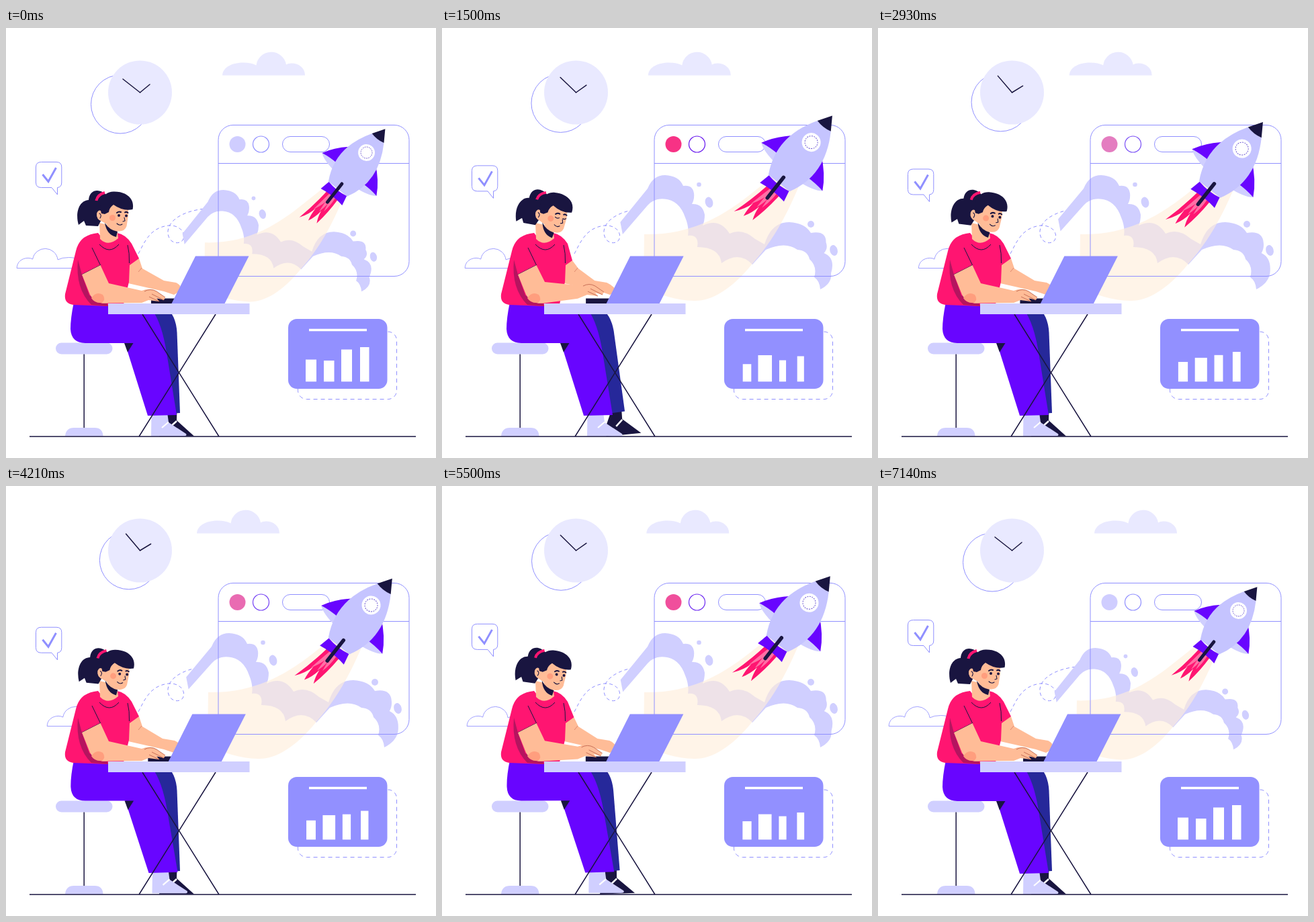
Recreate the animation shown at these times as an HTML page. Size 640 by 640 pixels, loop 7210 ms.

```html
<!DOCTYPE html>
<html lang="en">
<head>
<meta charset="utf-8">
<title>Launch</title>
<style>
  html, body { margin: 0; width: 100%; height: 100%; overflow: hidden; background: #fff; }
  svg { display: block; width: 100%; height: 100%; }
  .line { fill: none; stroke: #9090ff; }
  .ink { fill: none; stroke: #191540; }
  .dark { fill: #191540; }
  .pale { fill: #e9e9ff; }
  .lilac { fill: #d0cfff; }
  .peri { fill: #9290ff; }
  .violet { fill: #6805ff; }
  .red { fill: #ff1571; }
  .skin { fill: #ffbc97; }
  .white { fill: #fff; }
</style>
</head>
<body>
<svg viewBox="0 0 640 640">
  <defs>
    <path id="cloud" d="M0 0C1-13 16-19 31-19Q43-19 50.500-15A22.500 22.500 0 0 1 95-16Q98-18 103-18C114-18 123-11 123 0Z"/>
    <g id="wing">
      <path fill="#d0cfff" d="M58 97Q48 105 21 108L26 92Z"/>
      <path class="violet" d="M22 55Q46 74 58 97Q42 94 27 95Z"/>
    </g>
  </defs>

  <use href="#cloud" id="skyCloud" class="pale"/>
  <circle id="ring" class="line" r="43.500"/>
  <circle class="pale" cx="199.500" cy="96" r="47.500"/>
  <g class="ink" stroke-width="1.500" stroke-linecap="round">
    <path id="minuteHand" d="M199.500 96L174 76"/>
    <path id="hourHand" d="M199.500 96L214 84"/>
  </g>
  <g id="bubble" class="line">
    <path d="M52.500 199.500H75Q82.800 199.500 82.800 207V230Q82.800 237 76.500 237.500V248L68 237.500H52.500Q44.500 237.500 44.500 230V207Q44.500 199.500 52.500 199.500Z"/>
    <path stroke-width="3" d="M54.500 218L63 228.500L74.500 208"/>
  </g>
  <g id="lowCloud" class="line"><use href="#cloud" transform="translate(103 0) scale(-.84 .84)"/></g>

  <path class="line" stroke-dasharray="5 4" d="M197 336C207 317 215 297 242 294C262 293 269 309 262 317C253 324 240 317 241 302C243 286 262 273 295 269"/>

  <g id="trail">
    <path id="smoke" class="lilac"/>
    <g class="lilac">
      <circle cx="382.500" cy="233" r="3.300"/><ellipse cx="397.500" cy="259.500" rx="5.700" ry="8" transform="rotate(-15 397.500 259.500)"/>
      <circle cx="549" cy="292" r="5"/><ellipse cx="583" cy="331" rx="5.700" ry="8" transform="rotate(-15 583 331)"/>
    </g>
    <path fill="#ffeedb" fill-opacity=".64" d="M301 307C375 309 425 275 466 242L500 215L535 226C518 268 497 312 461 352C430 390 400 407 375 406Q335 405 300 384Z"/>
  </g>

  <g class="line">
    <rect x="316" y="144.500" width="284" height="225" rx="22"/>
    <path d="M316 201.500H600"/>
    <rect x="411.500" y="161.500" width="70" height="23" rx="11.500"/>
    <circle id="ringDot" cx="379.500" cy="173" r="12" stroke-width="1.200"/>
  </g>
  <circle id="dot" cx="344.500" cy="173" r="12"/>

  <!-- Drawn nose up from its tip, then tilted. -->
  <g id="rocket">
    <g id="flame">
      <path class="red" d="M-12 142Q-14 172-21 205Q-11 190-9 176Q-9 190-6 200Q0 188 1 174Q3 186 8 195Q12 168 11 142Z"/>
      <path fill="#ff6fa5" d="M-6 142Q-9 162-11 180Q-5 168-3 158Q-2 172-1 177Q2 166 2 157L5 172Q8 158 6 142Z"/>
    </g>
    <use href="#wing"/><use href="#wing" transform="scale(-1 1)"/>
    <path fill="#c5c4ff" d="M-12.700 19.600Q-48 76-20 128H20Q48 76 12.700 19.600Z"/>
    <path class="dark" d="M0 0L-12.700 19.600Q0 23 12.700 19.600Z"/>
    <path class="violet" d="M-19 128Q0 132 19 128L22.700 145Q0 141-22.700 145Z"/>
    <path class="ink" stroke-width="5.500" stroke-linecap="round" d="M0 117V156"/>
    <circle class="white" cy="50.500" r="14"/>
    <circle class="ink" cy="50.500" r="9.500" stroke-dasharray="2 1.500" style="stroke:#6a55d0"/>
  </g>

  <rect class="line" x="434.500" y="452" width="147" height="100.500" rx="13" stroke-dasharray="6 5"/>
  <rect class="peri" x="420" y="433" width="147.500" height="104" rx="13"/>
  <path class="white" d="M451 447.700H537V451.300H451Z"/>
  <g id="bars" class="white"></g>

  <g class="lilac">
    <rect x="74" y="468.500" width="84.500" height="17" rx="8.500"/>
    <path d="M88 607.500Q89 595 101 595H132Q144 595 144.500 607.500Z"/>
  </g>
  <path class="ink" stroke-width="1.500" d="M116.200 485.500V595"/>

  <g id="farLeg">
    <path class="dark" d="M240 568H254.500L254 584L280 607.500H228L230 590Z"/>
    <path stroke="#fff" stroke-width="2.500" d="M244 594L254 585"/>
    <path fill="#26289a" d="M200 415H237Q253 427 254.500 453L259 573L235 574Z"/>
  </g>
  <g id="nearShoe">
    <path class="lilac" d="M216.500 572H240L242 587L268 604Q270 607.500 264 607.500H216Z"/>
    <path stroke="#fff" stroke-width="2.200" d="M232 595L242 586.500"/>
  </g>
  <path id="nearLeg" class="violet"/>
  <path id="notch" class="dark" d="M176 469H189.500L181 482.500Z"/>
  <path class="ink" stroke-width="1.500" d="M203 426L317 608M312 426L198 608M35 608H610"/>

  <path id="farArm" class="skin"/>
  <path fill="none" stroke="#e08a70" d="M197 363L202 357"/>
  <path id="shirt" class="red"/>
  <path fill="#b5145f" d="M107 345Q103 388 127 412L152 414L150 408L124 398L113 367Z"/>
  <path class="skin" d="M139 290L140 314Q152 326 167 313L165 296Z"/>
  <path class="ink" d="M139 322Q154 338 168 322M128 327L140.500 353L113 367M181 323Q184 335 183.500 350"/>

  <g id="head">
    <path class="dark" d="M149 248C139 238 124 240 123 256C108 257 103 276 108 293L116 287L119 294L137 295L149 272Z"/>
    <path class="skin" d="M146 258L182 262L182 279L179.500 295Q177 302.500 168 302.500Q158 302 150 292L143 288Q134 285 135 276Q138 268 144 274Z"/>
    <path class="dark" d="M147 290Q154 301 166 303L164 311Q150 308 147 290Z"/>
    <path class="dark" d="M142 276C137 258 145 244 160 243.500C179 243 192 254 188.500 270Q174 273 160 263Q154 267 153 274L147 277Z"/>
    <path fill="none" stroke="#ff1571" stroke-width="4" d="M134.500 257Q136 248 147 245"/>
    <circle fill="#ff9e7e" cx="158.500" cy="282.500" r="4.500"/>
    <g class="ink" stroke-linecap="round">
      <path stroke-width="2" d="M165 275Q168 272.500 171 274M177 274.500Q179 273 181.500 275"/>
      <path stroke-width="1.100" d="M176 282L177 287L174 288M165 291Q169 295 173 292M139 276Q143 278 140 283"/>
      <path id="lids" stroke-width="1.200" d="M165 279.500Q168 282 171 280M176.500 280.500Q178.500 282 181 280"/>
    </g>
    <g id="eyes" class="dark"><circle cx="168" cy="279" r="2"/><circle cx="179" cy="279.500" r="2"/></g>
  </g>

  <g id="laptopBase"><path class="dark" d="M216 402.500H255V411H216Z"/></g>
  <path id="nearArm" class="skin"/>
  <path id="fingers" fill="none" stroke="#c87058"/>
  <path fill="#ff9e7e" d="M127 402Q134 391 144 397Q149 404 143 409Q132 410 127 402Z"/>
  <path id="screen" class="peri" d="M282 339.500H361.500L325 411H246Z"/>
  <rect class="lilac" x="152" y="410" width="210.500" height="16"/>
</svg>

<script>
const LOOP = 7210, STEPS = 101;
const el = id => document.getElementById(id);
const set = (id, name, value) => el(id).setAttribute(name, value);
const place = (id, value) => set(id, 'transform', value);
const lerp = (a, b, k) => a + (b - a) * k;
const wave = turns => (1 - Math.cos(2 * Math.PI * turns)) / 2;
const mix = (a, b, k) => `rgb(${a.map((v, i) => Math.round(lerp(v, b[i], k)))})`;

// Eased value through [step, value] keys.
function keyed(n, keys) {
  const i = Math.max(1, keys.findIndex(key => key[0] >= n));
  const [[n0, a], [n1, b]] = [keys[i - 1], keys[i]];
  return lerp(a, b, wave((n - n0) / (n1 - n0) / 2));
}

// Each bar: x, width and top at rest, then at the peak.
const bars = [
  [446, 16, 493.5, 448, 12, 501.5], [473, 15.5, 495, 470, 21.5, 485.5],
  [499, 16, 478.5, 502.5, 9, 497.5], [527, 13.5, 475, 529, 9.5, 491]
];
el('bars').innerHTML = '<rect/>'.repeat(bars.length);

function smokePath(drift) {
  const a = 5 * (1 - drift), b = 8 * (1 - drift);
  return `M${272 - a} ${302 + b}L${268.5 - a} ${284 + b}L306 239Q314 219 332 219Q353 220 359 235
    Q373 233 375 246Q376 255 372 262Q388 261 391 278Q391 287 388 294Q413 282 428 306
    Q447 297 466 314L480 322Q490 289 517 289Q540 290 549 305Q572 301 ${574 - b / 2} 319
    Q575 328 ${571 - b / 2} 335Q586 342 ${584 - b} 365Q581 380 563 389
    Q562 376 554 371Q559 355 547 344Q544 331 529 330Q511 317 482 330L462 352
    Q442 331 416 350Q413 326 380 326Q383 307 366 309Q368 296 362 282Q353 256 331 254.5
    Q316 253 306 264Z`;
}

function draw(n) {
  const p = n / 100;
  const drift = wave(p);
  const pulse = wave(3 * p);
  const fromEnd = Math.min(n, 100 - n);
  const steady = fromEnd / 50;
  const grow = lerp(.89, 1, wave(Math.min(1, fromEnd / 11) / 2));
  const nod = keyed(n, [[0, 0], [20, 7], [62, 2.1], [87, 6.3], [100, 0]]);
  const typing = keyed(n, [[0, 0], [20, 1], [39, 0], [62, 0], [87, .6], [100, 0]]);
  const farKick = keyed(n, [[0, 0], [18, 1], [38, 0], [70, 0], [86, 1], [100, 0]]);
  const nearKick = keyed(n, [[0, 0], [54, 0], [68, 1], [82, 0], [100, 0]]);

  place('skyCloud', `translate(${322 - 40.5 * drift} 70.5)`);
  place('lowCloud', `translate(${16.5 + 48 * drift} 357.5)`);
  place('ring', `translate(${170 + 15.3 * steady} ${113.5 - 3.8 * steady})`);
  place('minuteHand', `rotate(${13.8 * steady} 199.5 96)`);
  place('hourHand', `rotate(${10 * steady} 199.5 96)`);
  place('bubble', `translate(0 ${12.8 * steady})`);

  place('trail', `translate(255 419) scale(${grow}) translate(-255 -419)`);
  set('smoke', 'd', smokePath(drift));
  place('rocket', `translate(${564.4 + 19.6 * pulse} ${150.2 - 23.4 * pulse}) rotate(38.3) scale(${grow})`);
  place('flame', `rotate(${7 * pulse} 0 150)`);
  set('dot', 'fill', mix([207, 205, 255], [255, 21, 110], pulse));
  el('ringDot').style.stroke = mix([145, 144, 255], [95, 0, 235], pulse);

  bars.forEach(([x, w, top, x2, w2, top2], i) => {
    const bar = el('bars').children[i], y = lerp(top, top2, pulse);
    bar.setAttribute('x', lerp(x, x2, pulse));
    bar.setAttribute('width', lerp(w, w2, pulse));
    bar.setAttribute('y', y);
    bar.setAttribute('height', 526.3 - y);
  });

  place('head', `rotate(${nod} 152 310)`);
  const blink = n >= 20 && n <= 22;
  set('eyes', 'visibility', blink ? 'hidden' : 'visible');
  set('lids', 'visibility', blink ? 'visible' : 'hidden');

  const k = nearKick, u = typing;
  place('farLeg', `rotate(${-6 * farKick} 240 440)`);
  place('nearShoe', `translate(${8 * k} ${-6 * k})`);
  place('notch', `translate(${3 * k} ${-3 * k})`);
  set('nearLeg', 'd', `M101 408Q96 432 ${96 + 2 * k} 448Q${97 + 2 * k} 468.500 118 ${469 - 2 * k}L${177 + 3 * k} ${469 - 3 * k}
    L${211 + 8 * k} ${577 - 5 * k}L${254 + 8 * k} ${576 - 6 * k}L${239 + 5 * k} 483Q${232 + 3 * k} 440 218 420L150 408Z`);

  const slide = `translate(${-5 * drift} 0)`;
  place('screen', slide);
  place('laptopBase', slide);
  set('shirt', 'd', `M131 306Q109 310 104 332L88 396Q86 410 100 412L152 414L175 411L183 378L184 353
    L${198 - 4 * u} ${343 + 3 * u}L187 321Q178 307 165 305Q153 328 137 305Z`);
  const fx = -7 * u - 2 * drift;
  set('farArm', 'd', `M182 352L${198 - 4 * u} ${343 + 3 * u}L203 358L${235 + fx} 376L${253 + fx} 379
    Q${262 + fx} 383 260 391L250 397L235 392L182 380Z`);
  const hx = 4 * u, hy = -8 * u;
  set('nearArm', 'd', `M113 367L140.500 353L153 ${380 - 2 * u}L202 ${391 + hy}Q${215 + hx} ${386 + hy} ${224 + hx} ${392 + hy}
    L${237 + hx} ${401 + hy}L${235 + hx} ${405 + hy}L${224 + hx} ${402 + hy}L${228 + hx} ${407 + hy}L${212 + hx} ${405 + hy}
    L202 ${409 + hy * .8}L152 409.500Q134 412 125 397Z`);
  set('fingers', 'd', `M${206 + hx} ${392 + hy}Q${215 + hx} ${387 + hy} ${224 + hx} ${392 + hy}L${237 + hx} ${401 + hy}
    M${217 + hx} ${396 + hy}L${235 + hx} ${405 + hy}M${213 + hx} ${400 + hy}L${228 + hx} ${407 + hy}`);
}

function tick() {
  draw(Math.floor(performance.now() % LOOP / LOOP * STEPS));
  requestAnimationFrame(tick);
}
tick();
</script>
</body>
</html>
```
